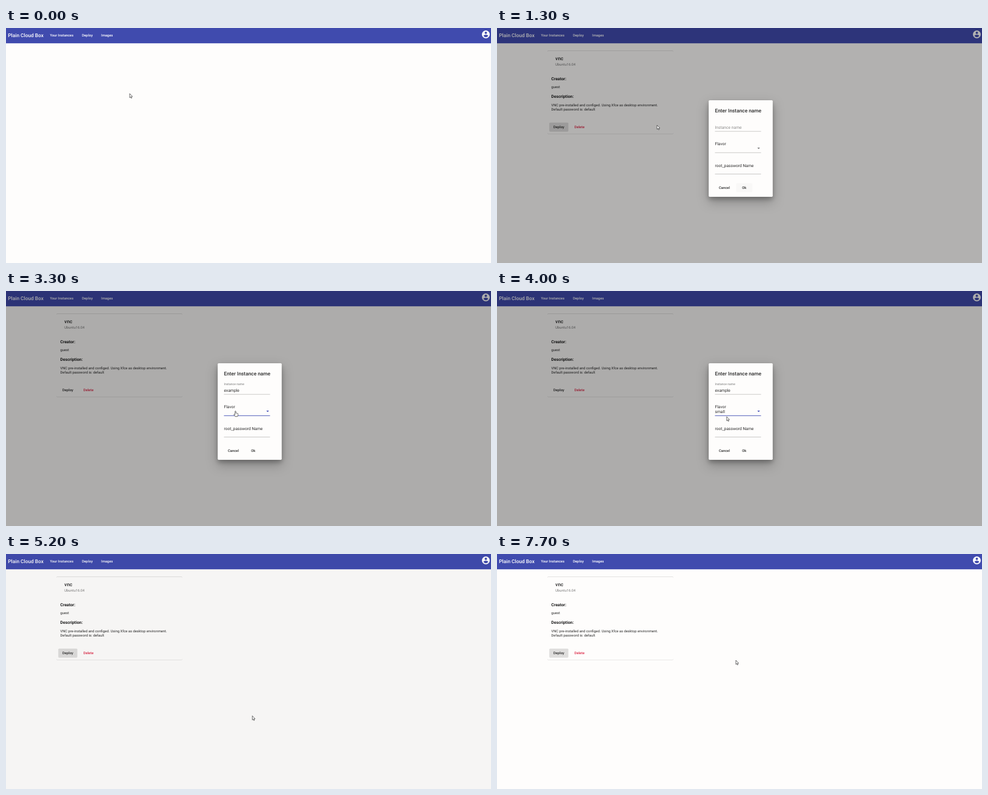
These frames come from a looping animation (800x387 px, 8000 ms). An HTML page:

```html
<!DOCTYPE html>
<html lang="en">
<head>
<meta charset="utf-8">
<title>Instance deployment</title>
<style>
  html, body { margin: 0; width: 100%; height: 100%; overflow: hidden; background: #fefdfc; }
  svg { display: block; width: 100vw; height: 100vh; }
  text { font: 5.83px Roboto, sans-serif; fill: #2b2b2b; text-rendering: geometricPrecision; white-space: pre; }
  .btn { font-weight: 500; }
  .nav { font-weight: 500; fill: #fff; }
  .title { font-size: 8.33px; font-weight: 500; }
  .head { font-size: 6.83px; font-weight: 700; fill: #1c1c1c; }
  .field { font-size: 6.73px; }
  .hint { fill: #8c8c8b; }
  .float { font-size: 5.08px; fill: #777; }
  .paper { fill: #fefdfc; }
  .card { filter: drop-shadow(0 .6px .4px rgba(0,0,0,.3)) drop-shadow(0 .4px .6px rgba(0,0,0,.14)); }
  .modal { filter: drop-shadow(0 4px 3.5px rgba(0,0,0,.24)) drop-shadow(0 7px 9px rgba(0,0,0,.26)); }
  .menu { filter: drop-shadow(0 1px 1.2px rgba(0,0,0,.3)); }
  .line { stroke: #949493; stroke-width: .5; }
  .line.on { stroke: #3f4bb5; stroke-width: .9; }
  .caret { stroke: #222; stroke-width: .5; }
  .pointer { fill: #fff; stroke: #222; stroke-width: .65; stroke-linejoin: round; }
</style>
</head>
<body>
<svg viewBox="0 0 800 387" preserveAspectRatio="none">
  <rect class="paper" width="800" height="387"/>
  <rect width="800" height="25.2" fill="#404bae"/>
  <text class="nav title" x="3.3" y="15">Plain Cloud Box</text>
  <text class="nav" x="72.4" y="14">Your Instances</text>
  <text class="nav" x="125.2" y="14">Deploy</text>
  <text class="nav" x="157" y="14">Images</text>
  <path transform="translate(783.7 2.7) scale(.65)" fill="#fff" d="M12 2a10 10 0 1 0 0 20 10 10 0 0 0 0-20zm0 3a3 3 0 1 1 0 6 3 3 0 0 1 0-6zm0 14.2c-2.5 0-4.7-1.3-6-3.2 0-2 4-3.1 6-3.1s6 1.1 6 3.1c-1.3 1.9-3.5 3.2-6 3.2z"/>

  <g id="card">
    <rect class="paper card" x="83" y="37.5" width="208" height="136.8" rx="1.6"/>
    <text class="title" x="96.3" y="52.8">vnc</text>
    <text x="96.3" y="62.2" fill-opacity=".62">Ubuntu16.04</text>
    <text class="head" x="89.5" y="85.5">Creator:</text>
    <text x="89.5" y="99.2">guest</text>
    <text class="head" x="89.5" y="115.2">Description:</text>
    <text x="89.5" y="129">VNC pre-installed and configed. Using Xfce as desktop environment.</text>
    <text x="89.5" y="136">Default password is: default</text>
    <rect id="deploy" x="86.2" y="155.7" width="31.5" height="15" rx="1.6"/>
    <text class="btn" x="93" y="165.1">Deploy</text>
    <text class="btn" x="127.7" y="165.1" style="fill:#dd2a48">Delete</text>
  </g>

  <rect id="shade" width="800" height="387"/>

  <g id="dialog">
    <rect class="paper modal" x="349.2" y="118.9" width="105.6" height="159" rx="1.6"/>
    <text class="title" x="359.5" y="138.6">Enter Instance name</text>
    <text id="nameHint" class="hint field" x="359.5" y="165.6">Instance name</text>
    <text id="nameLabel" class="float" x="359.5" y="155.4">Instance name</text>
    <text id="name" class="field" x="359.5" y="165.6"></text>
    <path id="nameLine" class="line" d="M359.5 170.2h76"/>
    <text class="field" x="359.5" y="193.1">Flavor</text>
    <text id="flavor" class="field" x="359.5" y="200.8">small</text>
    <path id="arrow" d="M429.4 197h4.4l-2.2 2.3z"/>
    <path id="flavorLine" class="line" d="M359.5 205.3h76"/>
    <text class="field" x="359.5" y="228.7">root_password Name</text>
    <text id="pass" class="field" x="359.5" y="236"></text>
    <path id="passLine" class="line" d="M359.5 240.5h76"/>
    <path id="caret" class="caret"/>
    <text class="btn" x="366" y="265.4">Cancel</text>
    <rect id="ok" x="394.6" y="255.6" width="26.7" height="15" rx="1.6"/>
    <circle id="ripple" cx="405.5" cy="266.5" r="6" fill-opacity=".1"/>
    <text class="btn" x="404.2" y="265.4">Ok</text>
  </g>

  <g id="menu">
    <rect class="paper menu" x="352.8" y="188" width="89.4" height="60" rx="1.6"/>
    <rect x="352.8" y="188" width="89.4" height="20" fill-opacity=".05"/>
    <text class="field" x="359.5" y="200.5">small</text>
    <text class="field" x="359.5" y="220.5">medium</text>
    <text class="field" x="359.5" y="240.5">large</text>
  </g>

  <path id="pointer" class="pointer"/>
</svg>
<script>
const LOOP = 8000, STEP = 100;
const el = id => document.getElementById(id);
const show = (id, on) => { el(id).style.display = on ? '' : 'none'; };
const opacity = (id, v) => el(id).setAttribute('fill-opacity', v);

const shapes = {
  arrow: 'M0 0V6.8L1.5 5.4 2.5 7.7 3.6 7.2 2.6 5 4.6 4.9z',
  hand: 'M-.7 .6Q0-.5.7 .6V3.6Q1.4 3 2 3.8 2.7 3.3 3.2 4.1 4.2 3.8 4.2 5V7L3.4 9.2H-.5L-2.7 5.8Q-2.6 4.6-.7 6z',
  beam: 'M-1.2-3.5H1.2M0-3.5V3.5M-1.2 3.5H1.2'
};

// time, x, y, pointer shape from then on
const route = [
  [0, 204, 108, 'arrow'], [500, 204, 108, 'arrow'], [1100, 96, 162.5, 'hand'],
  [1200, 96, 162.5, 'hand'], [1300, 264, 160, 'arrow'], [1600, 385, 163, 'beam'],
  [2700, 385, 163, 'arrow'], [3100, 378.5, 197.5, 'hand'], [3900, 378.5, 197.5, 'arrow'],
  [4200, 380, 234, 'beam'], [4700, 380, 234, 'arrow'], [5000, 406.3, 266, 'hand'],
  [5200, 406.3, 266.5, 'arrow'], [5500, 394, 175, 'arrow'], [LOOP, 394, 175, 'arrow']
];

function movePointer(t) {
  const i = route.findIndex((p, n) => t < route[n + 1][0]);
  const [t0, x0, y0, shape] = route[i], [t1, x1, y1] = route[i + 1];
  const u = (t - t0) / (t1 - t0), k = u * u * (3 - 2 * u);
  el('pointer').setAttribute('d', shapes[shape]);
  el('pointer').setAttribute('transform', `translate(${x0 + (x1 - x0) * k} ${y0 + (y1 - y0) * k})`);
}

// letters of a word typed one by one between two times
const typed = (word, t, from, to) =>
  word.slice(0, Math.max(0, Math.ceil((t - from) / (to - from) * word.length)));

function draw(t) {
  const within = (a, b) => t >= a && t < b;
  const open = within(1300, 5200);
  const onName = within(1600, 3200), onFlavor = within(3200, 4200), onPass = within(4200, 5000);

  show('card', t >= 500);
  opacity('deploy', within(1100, 1300) ? .045 : within(1300, 1600) || t >= 5200 ? .12 : 0);
  opacity('shade', within(1300, 1400) ? .3 : open ? .32 : within(5200, 5300) ? .03 : 0);

  show('dialog', open);
  show('nameHint', t < 1600);
  show('nameLabel', t >= 1600);
  el('name').textContent = typed('example', t, 1900, 2600);
  show('flavor', t >= 3900);
  el('pass').textContent = typed('••••••••', t, 4200, 4700);
  el('nameLine').classList.toggle('on', onName);
  el('flavorLine').classList.toggle('on', onFlavor);
  el('passLine').classList.toggle('on', onPass);
  el('arrow').setAttribute('fill', onFlavor ? '#3f4bb5' : '#757574');
  show('menu', within(3400, 3900));

  show('caret', open && (onName || onPass) && t % 1000 < 500);
  const input = el(onPass ? 'pass' : 'name');
  const end = 359.7 + (open ? input.getComputedTextLength() : 0);
  el('caret').setAttribute('d', `M${end} ${onPass ? 230.5 : 160}v6.5`);

  opacity('ok', t >= 5000 ? .05 : t < 1600 ? .02 : 0);
  show('ripple', t >= 5100);
  movePointer(t);
}

function tick(now) {
  draw(Math.floor(now % LOOP / STEP) * STEP);
  requestAnimationFrame(tick);
}
requestAnimationFrame(tick);
</script>
</body>
</html>
```
